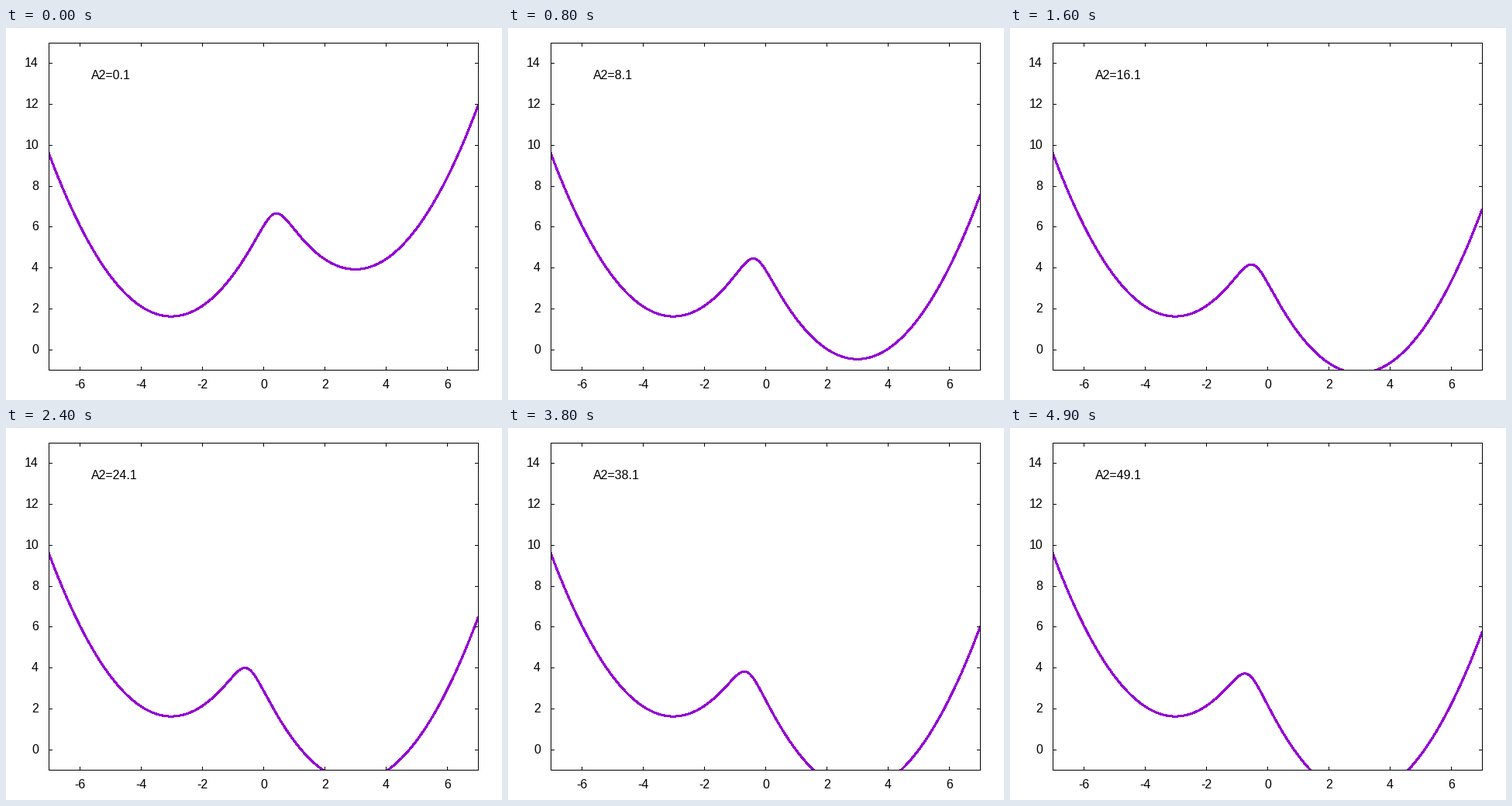
Recreate the animation shown at these times as a matplotlib script. Size 640 px wide and 480 px high, loop 5 s.

```python
import numpy as np
import matplotlib.pyplot as plt
from matplotlib.animation import FuncAnimation
from matplotlib.patches import Rectangle

WIDTH, HEIGHT, DPI = 640, 480, 80
PX = 72 / DPI  # one pixel in points
LEFT, RIGHT, TOP, BOTTOM = 55, 609, 19, 441
X_MIN, X_MAX, Y_MIN, Y_MAX = -7, 7, -1, 15
TICK = 5
FRAMES, INTERVAL = 50, 100

plt.rcParams["font.family"] = "Liberation Sans"
fig = plt.figure(figsize=(WIDTH / DPI, HEIGHT / DPI), dpi=DPI, facecolor="white")
ax = fig.add_axes([0, 0, 1, 1])
ax.set_xlim(0, WIDTH)
ax.set_ylim(HEIGHT, 0)
ax.axis("off")


def to_px(x):
    return LEFT + (x - X_MIN) * (RIGHT - LEFT) / (X_MAX - X_MIN)


def to_py(y):
    return BOTTOM - (y - Y_MIN) * (BOTTOM - TOP) / (Y_MAX - Y_MIN)


def block(x, y, w, h):
    ax.add_patch(Rectangle((x, y), w, h, facecolor="black", linewidth=0,
                           antialiased=False, zorder=3))


def label(x, y, text, align):
    return ax.text(x, y, text, ha=align, va="baseline", fontsize=16 * PX,
                   color="black", zorder=4)


def potential(x, a2):
    """Negative log of two unit-width normal peaks at -3 and 3."""
    peaks = np.exp(-(x + 3) ** 2 / 2) + a2 * np.exp(-(x - 3) ** 2 / 2)
    return -np.log(peaks / (2 * np.sqrt(2 * np.pi)))


# Border
for y in (TOP, BOTTOM):
    block(LEFT, y, RIGHT - LEFT + 1, 1)
for x in (LEFT, RIGHT):
    block(x, TOP, 1, BOTTOM - TOP + 1)

# Mirrored inward ticks with labels
for value in range(-6, 7, 2):
    x = round(to_px(value))
    block(x, TOP, 1, TICK)
    block(x, BOTTOM - TICK + 1, 1, TICK)
    label(x + 0.5, 465, str(value), "center")
for value in range(0, 15, 2):
    y = round(to_py(value))
    block(LEFT, y, TICK, 1)
    block(RIGHT - TICK + 1, y, TICK, 1)
    label(42, y + 5, str(value), "right")

xs = np.linspace(X_MIN, X_MAX, 1000)
curve, = ax.plot([], [], color="#9400D3", linewidth=2 * PX, antialiased=False, zorder=2)
curve.set_clip_path(Rectangle((LEFT, TOP), RIGHT - LEFT + 1, BOTTOM - TOP + 1,
                              transform=ax.transData))
caption = label(110, 66, "", "left")


def update(i):
    a2 = i + 0.1
    curve.set_data(to_px(xs), to_py(potential(xs, a2)))
    caption.set_text(f"A2={a2:.1f}")
    return curve, caption


anim = FuncAnimation(fig, update, frames=FRAMES, interval=INTERVAL,
                     repeat=True, repeat_delay=0)
plt.show()
```
